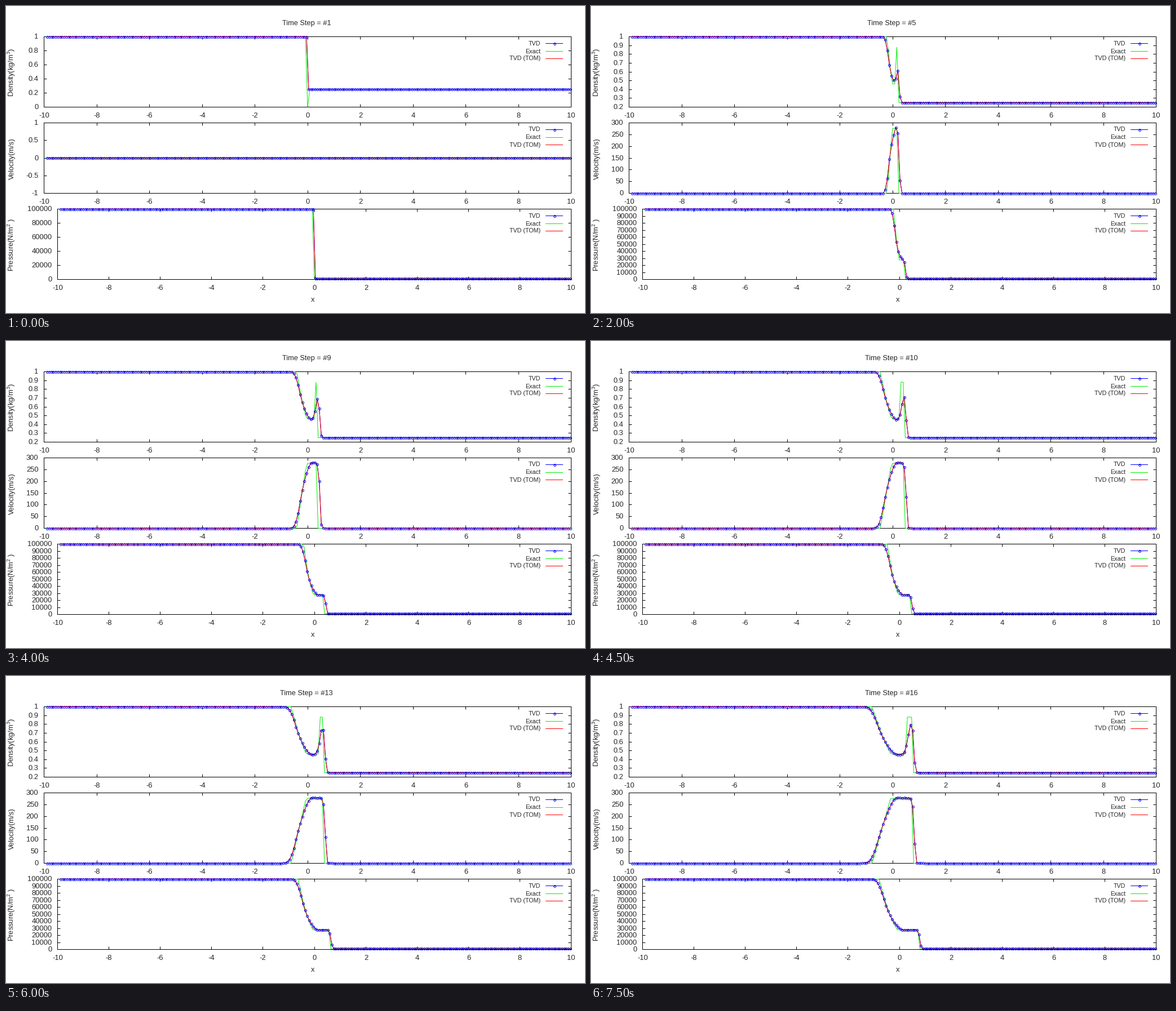
Animation of 1027x545 px, one loop 8000 ms. Source, as a matplotlib script:

```python
import numpy as np
import matplotlib.pyplot as plt
from matplotlib.animation import FuncAnimation

W, H, DPI = 1027, 545, 100
PX = 72 / DPI
STEPS = 16
BLUE, GREEN, RED, INK = "#0000ff", "#00f000", "#ff0000", "#262626"

# Shock tube: gas constant ratio, grid and initial states
G = 5 / 3
N, DX, CFL = 250, 0.08, 0.95
RHO_L, P_L = 1.0, 1e5
RHO_R, P_R = 0.25, 1e3
X = -10 + DX * (np.arange(N) + 0.5)
X_EXACT = np.linspace(-10, 10, N + 1)
DT_EXACT = 1.27e-4

plt.rcParams["font.family"] = "Liberation Sans"
plt.rcParams["mathtext.default"] = "regular"


def primitive(U):
    rho = U[0]
    u = U[1] / rho
    return rho, u, (G - 1) * (U[2] - 0.5 * rho * u * u)


def minmod(a, b):
    return np.where(a * b > 0, np.sign(a) * np.minimum(abs(a), abs(b)), 0)


def harmonic(a, b):
    same = a * b > 0
    return np.where(same, 2 * a * b / np.where(same, a + b, 1), 0)


def viscosity(z, eps=0.05):
    return np.where(abs(z) < eps, (z * z + eps * eps) / (2 * eps), abs(z))


def advance(U, contact_limiter):
    """One step of the modified-flux TVD scheme with Roe averages."""
    rho, u, p = primitive(U)
    enthalpy = (U[2] + p) / rho
    ratio = CFL / np.max(abs(u) + np.sqrt(G * p / rho))
    flux = np.array([U[1], U[1] * u + p, u * (U[2] + p)])

    w = np.sqrt(rho)
    total = w[:-1] + w[1:]
    ua = (w[:-1] * u[:-1] + w[1:] * u[1:]) / total
    ha = (w[:-1] * enthalpy[:-1] + w[1:] * enthalpy[1:]) / total
    ra = w[:-1] * w[1:]
    c2 = (G - 1) * (ha - 0.5 * ua * ua)
    c = np.sqrt(c2)
    d_rho, d_u, d_p = np.diff(rho), np.diff(u), np.diff(p)
    alpha = np.array([(d_p - ra * c * d_u) / (2 * c2),
                      d_rho - d_p / c2,
                      (d_p + ra * c * d_u) / (2 * c2)])
    one = np.ones_like(ua)
    vectors = [np.array([one, ua - c, ha - ua * c]),
               np.array([one, ua, 0.5 * ua * ua]),
               np.array([one, ua + c, ha + ua * c])]

    face = 0.5 * (flux[:, :-1] + flux[:, 1:])
    limiters = (minmod, contact_limiter, minmod)
    for a, r, speed, limit in zip(alpha, vectors, (ua - c, ua, ua + c), limiters):
        nu = ratio * speed
        gt = 0.5 * (viscosity(nu) - nu * nu) * a
        g = np.zeros(N)
        g[1:-1] = limit(gt[:-1], gt[1:])
        live = abs(a) > 1e-12
        shift = np.where(live, np.diff(g) / np.where(live, a, 1), 0)
        face += 0.5 / ratio * r * (g[:-1] + g[1:] - viscosity(nu + shift) * a)

    new = U.copy()
    new[:, 1:-1] -= ratio * np.diff(face, axis=1)
    return new


def simulate(contact_limiter):
    left = X < 0
    rho = np.where(left, RHO_L, RHO_R)
    p = np.where(left, P_L, P_R)
    U = np.array([rho, np.zeros(N), p / (G - 1)])
    states = []
    for _ in range(STEPS):
        states.append(primitive(U))
        U = advance(U, contact_limiter)
    return states


def star_state():
    c = np.sqrt(G * P_L / RHO_L)
    lo, hi = P_R, P_L
    for _ in range(60):
        p = (lo + hi) / 2
        fan = 2 * c / (G - 1) * (1 - (p / P_L) ** ((G - 1) / (2 * G)))
        shock = (p - P_R) * np.sqrt(
            2 / ((G + 1) * RHO_R) / (p + (G - 1) / (G + 1) * P_R))
        lo, hi = (p, hi) if fan > shock else (lo, p)
    return p, fan


def exact(t):
    left = X_EXACT < 0
    if t == 0:
        rho = np.where(left, RHO_L, RHO_R)
        p = np.where(left, P_L, P_R)
        rho[N // 2] = p[N // 2] = 0
        return rho, np.zeros(N + 1), p
    ps, us = star_state()
    c_l = np.sqrt(G * P_L / RHO_L)
    k = (G - 1) / (G + 1)
    rho_s = RHO_R * (ps / P_R + k) / (k * ps / P_R + 1)
    front = us * rho_s / (rho_s - RHO_R)

    s = X_EXACT / t
    u = np.clip(2 / (G + 1) * (c_l + s), 0, us)
    c = c_l - (G - 1) / 2 * u
    rho = RHO_L * (c / c_l) ** (2 / (G - 1))
    p = P_L * (c / c_l) ** (2 * G / (G - 1))
    rho = np.where(s > us, rho_s, rho)
    ahead = s > front
    return (np.where(ahead, RHO_R, rho), np.where(ahead, 0, u),
            np.where(ahead, P_R, p))


TVD = simulate(minmod)
TOM = simulate(harmonic)
EXACT = [exact(k * DT_EXACT) for k in range(STEPS)]

# left edge, label, first-step (low, high, tick), later (low, high, tick)
TOP, HEIGHT, PITCH, RIGHT = 54.5, 125, 153, 1002.5
PANELS = [
    (67.5, "Density(kg/m$^3$)", (0, 1, 0.2), (0.2, 1, 0.1)),
    (67.5, "Velocity(m/s)", (-1, 1, 0.5), (0, 300, 50)),
    (91.5, "Pressure(N/m$^2$ )", (0, 1e5, 2e4), (0, 1e5, 1e4)),
]

fig = plt.figure(figsize=(W / DPI, H / DPI), dpi=DPI, facecolor="white")
ax = fig.add_axes([0, 0, 1, 1])


def line(x, y, color, z):
    ax.plot(x, y, color=color, lw=PX, snap=False, zorder=z,
            solid_capstyle="butt", solid_joinstyle="miter")


def dots(x, y):
    ax.plot(x, y, "o", ms=4 * PX, mfc="none", mec=BLUE, mew=0.9 * PX,
            snap=False, zorder=6)
    ax.plot(x, y, "s", ms=PX, mfc=BLUE, mec="none", snap=False, zorder=6)


def text(x, y, s, size=12.9, ha="center", **kw):
    ax.text(x, y, s, fontsize=size * PX, ha=ha, va="baseline", color=INK, **kw)


def draw_frame(left, top, bottom, scale, sx, sy):
    line([left, RIGHT, RIGHT, left, left], [top, top, bottom, bottom, top], "black", 1)
    for v in range(-10, 11, 2):
        x = np.floor(sx(v)) + 0.5
        line([x, x], [bottom, bottom - 5], "black", 1)
        line([x, x], [top, top + 5], "black", 1)
        text(x, bottom + 18.5, str(v))
    low, high, tick = scale
    for i in range(round((high - low) / tick) + 1):
        v = round(low + i * tick, 6)
        y = np.floor(sy(v)) + 0.5
        line([left, left + 5], [y, y], "black", 1)
        line([RIGHT, RIGHT - 5], [y, y], "black", 1)
        text(left - 10, y + 3.5, f"{v:.6g}", ha="right")


def draw_legend(top):
    rows = zip(("TVD", "Exact", "TVD (TOM)"), (BLUE, GREEN, RED))
    for i, (name, color) in enumerate(rows):
        y = top + round(12 + 13.5 * i)
        text(948, y + 3, name, 10.7, "right")
        line([957, 988], [y, y], color, 3)
    dots([972.5], [top + 12])


def draw_panel(k, q):
    left, label, first, later = PANELS[q]
    top = TOP + PITCH * q
    bottom = top + HEIGHT
    scale = first if k == 0 else later
    low, high, _ = scale

    def sx(x):
        return left + (x + 10) / 20 * (RIGHT - left)

    def sy(y):
        return bottom - (y - low) / (high - low) * HEIGHT

    draw_frame(left, top, bottom, scale, sx, sy)
    text(14, top + 63.5, label, rotation=90, rotation_mode="anchor")
    draw_legend(top)

    x, y = sx(X[1:]), sy(TVD[k][q][1:])
    line(x, y, BLUE, 3)
    line(sx(X_EXACT[1:]), sy(EXACT[k][q][1:]), GREEN, 4)
    line(x, sy(TOM[k][q][1:]), RED, 5)
    dots(x, y)


def update(k):
    ax.clear()
    ax.set_xlim(0, W)
    ax.set_ylim(H, 0)
    ax.axis("off")
    text(533, 34, f"Time Step = #{k + 1}", 12.7)
    text(544.5, 525, "x")
    for q in range(3):
        draw_panel(k, q)
    return []


anim = FuncAnimation(fig, update, frames=STEPS, interval=500,
                     repeat=True, repeat_delay=0, blit=False)
plt.show()
```
